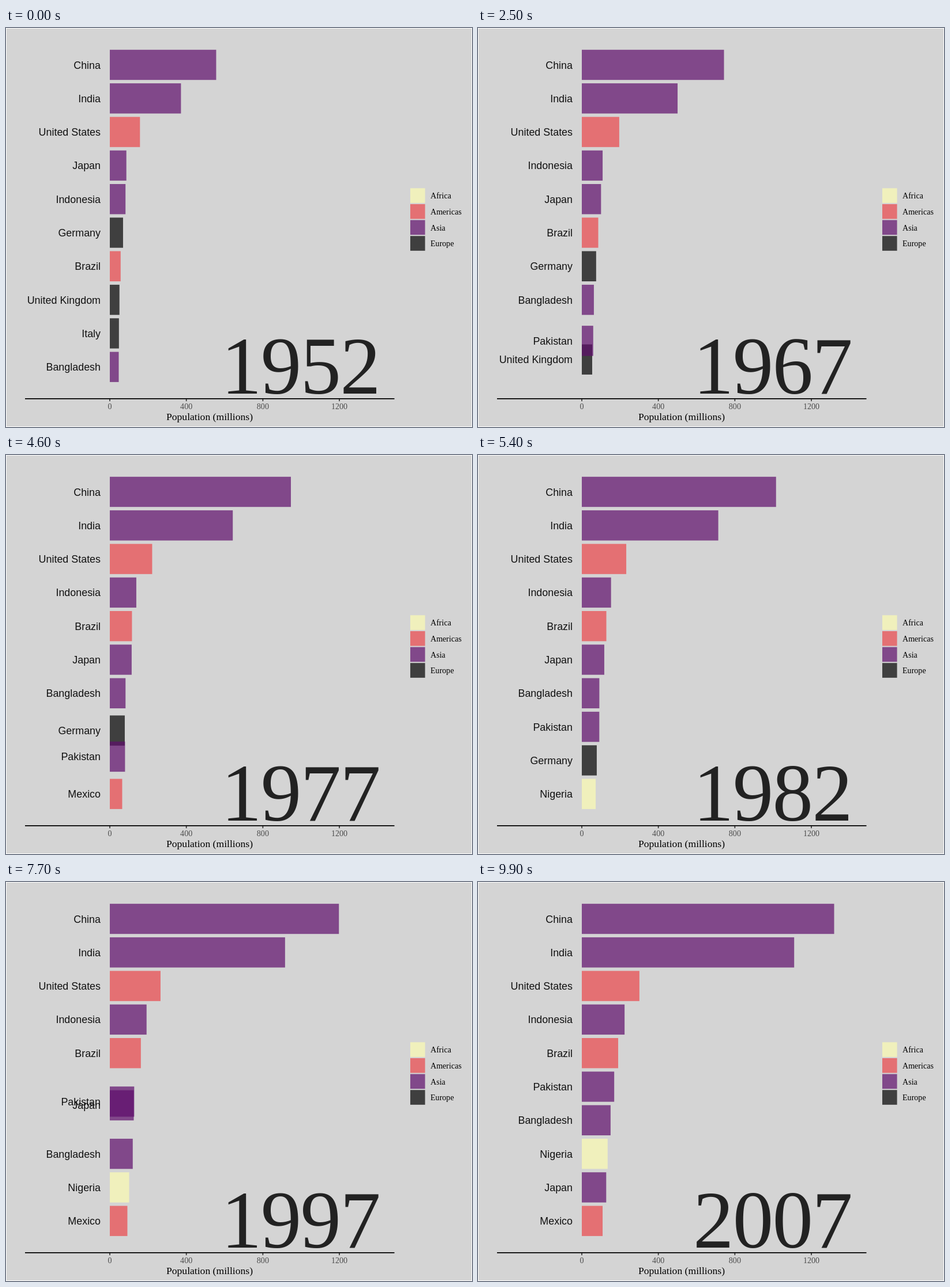
An HTML page that plays this animation: 808 by 693 pixels, repeating every 10 s.

```html
<!DOCTYPE html>
<html lang="en">
<head>
<meta charset="utf-8">
<title>Population by country</title>
<style>
  html, body { margin: 0; width: 100%; height: 100%; overflow: hidden; }
  svg { display: block; width: 808px; height: 693px; background: #d4d4d4; }
  text { font: 14.08px "Liberation Serif", Times, serif; }
  .name { font: 17.9px "Liberation Sans", Arial, sans-serif; fill: #111; text-anchor: end; }
  .tick { fill: #4d4d4d; text-anchor: middle; }
  .title { font-size: 17.6px; text-anchor: middle; }
  .year { font-size: 141px; letter-spacing: -1.7px; fill: #222; }
</style>
</head>
<body>
<svg viewBox="0 0 808 693">
  <rect x=".5" y=".5" width="807" height="692" fill="none" stroke="#fff"/>
  <g id="axis"></g>
  <g id="legend"></g>
  <g id="chart"></g>
</svg>
<script>
const COLORS = { Africa: '#fcfcb2', Americas: '#ec474a', Asia: '#5f0e6c', Europe: '#000' };
const X0 = 180, SCALE = 0.3317, TOP = 37.8, ROW = 58.3, BAR = 52.4;
const FIRST_YEAR = 1952, LAST = 11, STEPS = 9, STEP_MS = 100;

// Millions at a few key states, one state being five years; growth is linear between.
const KEYS = [0, 2, 5, 8, LAST];
const country = (name, region, ...pop) => ({ name, region, pop });
const countries = [
  country('China', 'Asia', 556, 675, 938, 1170, 1319),
  country('India', 'Asia', 372, 454, 634, 872, 1110),
  country('United States', 'Americas', 157.6, 187, 220, 257, 301),
  country('Indonesia', 'Asia', 82, 99, 136.7, 185, 223.5),
  country('Japan', 'Asia', 86.5, 95.8, 113.8, 124.6, 127.5),
  country('Brazil', 'Americas', 56.6, 76, 114.3, 156, 190),
  country('Germany', 'Europe', 69.2, 73.7, 78.2, 78, 82),
  country('United Kingdom', 'Europe', 50.4, 53.3, 57, 58, 61),
  country('Italy', 'Europe', 47.7, 50.8, 56, 57, 58),
  country('Bangladesh', 'Asia', 46.7, 56.8, 81, 113, 150.4),
  country('Pakistan', 'Asia', 41.3, 53.1, 78.1, 118, 169.3),
  country('Nigeria', 'Africa', 33, 41, 62.2, 93.4, 135),
  country('Mexico', 'Americas', 30, 38, 63.8, 88, 108.7),
];

const $ = id => document.getElementById(id);
const lerp = (a, b, t) => a + (b - a) * t;

function popAt({ pop }, state) {
  const i = Math.max(1, KEYS.findIndex(k => k >= state));
  return lerp(pop[i - 1], pop[i], (state - KEYS[i - 1]) / (KEYS[i] - KEYS[i - 1]));
}

const topTen = state =>
  [...countries].sort((a, b) => popAt(b, state) - popAt(a, state)).slice(0, 10);

const rect = (x, y, w, h, region) =>
  `<rect x="${x}" y="${y}" width="${w}" height="${h}" fill="${COLORS[region]}" fill-opacity=".7"/>`;
const text = (x, y, cls, s) => `<text x="${x}" y="${y}" class="${cls}">${s}</text>`;

$('axis').innerHTML = [0, 400, 800, 1200].map(v => {
  const x = X0 + v * SCALE;
  return `<path d="M${x} 643v5.2" stroke="#333" stroke-width="1.7"/>` + text(x, 661.8, 'tick', v);
}).join('') +
  '<path d="M33 643.8H673.5" stroke="#000" stroke-width="1.7"/>' +
  text(353, 680.8, 'title', 'Population (millions)');

$('legend').innerHTML = Object.keys(COLORS).map((region, i) => {
  const y = 278.3 + i * 27.65;
  return rect(701, y, 25.6, 25.6, region) + text(736, y + 18, '', region);
}).join('');

function draw(step) {
  const state = step / STEPS, from = Math.floor(state);
  const next = topTen(Math.min(from + 1, LAST));
  let bars = '', names = '';
  topTen(from).forEach((c, rank) => {
    // A country about to drop out keeps its row until the next state.
    const goal = next.includes(c) ? next.indexOf(c) : rank;
    const y = TOP + ROW * lerp(rank, goal, state - from);
    bars += rect(X0, y, popAt(c, state) * SCALE, BAR, c.region);
    names += text(164, y + 32.7, 'name', c.name);
  });
  const year = FIRST_YEAR + 5 * Math.round(state);
  $('chart').innerHTML = bars + names + text(372.9, 635.2, 'year', year);
}

const start = performance.now();
let shown = -1;
function tick() {
  const elapsed = Math.max(0, performance.now() - start);
  const step = Math.floor(elapsed / STEP_MS) % (LAST * STEPS + 1);
  if (step !== shown) draw(shown = step);
  requestAnimationFrame(tick);
}
tick();
</script>
</body>
</html>
```
